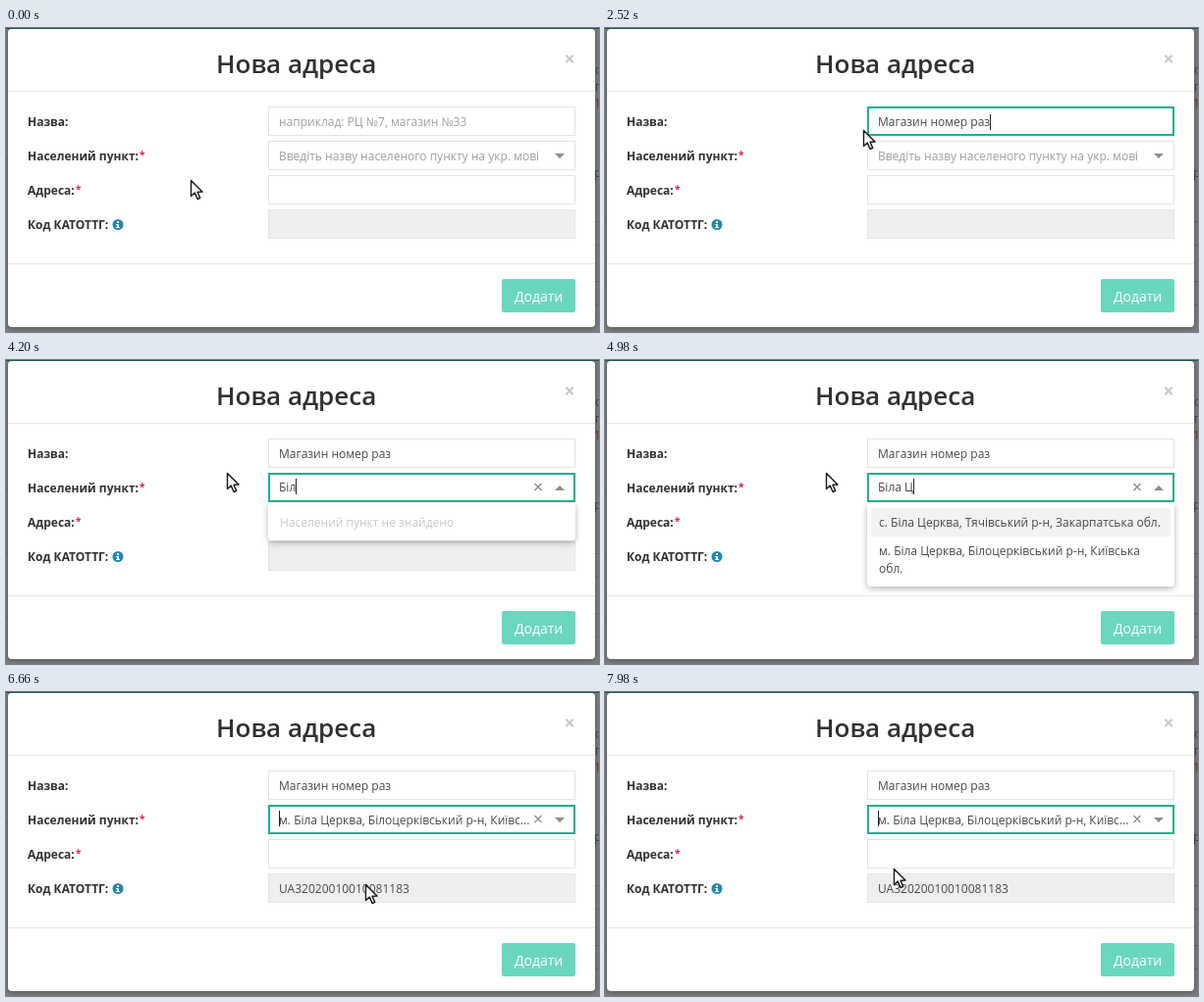
An HTML page with a canvas for the animation above (8000 ms loop, 604 px wide and 310 px high).

```html
<!DOCTYPE html>
<html lang="uk">
<head>
<meta charset="utf-8">
<title>Нова адреса</title>
<style>
html, body { margin: 0; width: 100%; height: 100%; overflow: hidden; background: #7c7c7c; }
canvas { display: block; width: 604px; height: 310px; }
</style>
</head>
<body>
<canvas id="stage"></canvas>
<script>
const W = 604, H = 310, LOOP = 8000, STEP = 60;
const FAMILY = '"Open Sans", "Noto Sans", sans-serif';
const GREEN = '#1fae90', TEXT = '#484848', HINT = '#9f9f9f', BORDER = '#e3e4e5';
const NAME = 'Магазин номер раз';
const QUERY = 'Біла Ц';

// Moments of the scene, in ms
const FOCUS_NAME = 1440, TYPE_NAME = 1500, OPEN_LIST = 2820;
const QUERY_KEYS = [3960, 4080, 4200, 4380, 4620, 4920];
const RESULTS = 4740, HOVER_SECOND = 6420, PICK = 6480;

// Pointer: time, x, y
const PATH = [
  [900, 188, 155], [960, 191, 153], [1020, 208, 142], [1080, 236, 121],
  [1140, 260, 104], [1260, 276, 91], [1440, 276, 91], [1620, 263, 104],
  [2580, 263, 104], [2760, 288, 126], [2880, 288, 126], [3060, 236, 122],
  [3180, 225, 115], [5520, 225, 115], [5700, 240, 126], [6000, 318, 168],
  [6240, 360, 196], [6360, 366, 201], [6540, 366, 196], [7200, 366, 196],
  [7380, 318, 182], [7620, 242, 168], [7800, 282, 177], [7920, 294, 180]
];

const canvas = document.getElementById('stage');
const ctx = canvas.getContext('2d');
const dpr = window.devicePixelRatio || 1;
canvas.width = W * dpr;
canvas.height = H * dpr;

function rect(x, y, w, h, color) {
  ctx.fillStyle = color;
  ctx.fillRect(x, y, w, h);
}

function round(x, y, w, h, r, color) {
  ctx.beginPath();
  ctx.roundRect(x, y, w, h, r);
  ctx.fillStyle = color;
  ctx.fill();
}

function poly(points, color) {
  ctx.beginPath();
  points.forEach(([x, y]) => ctx.lineTo(x, y));
  ctx.closePath();
  ctx.fillStyle = color;
  ctx.fill();
}

function text(str, x, y, color = TEXT, size = 12, weight = 400) {
  ctx.font = `${weight} ${size}px ${FAMILY}`;
  ctx.fillStyle = color;
  ctx.fillText(str, x, y);
  return ctx.measureText(str).width;
}

function cross(x, y, r, width, color) {
  ctx.beginPath();
  ctx.moveTo(x - r, y - r);
  ctx.lineTo(x + r, y + r);
  ctx.moveTo(x + r, y - r);
  ctx.lineTo(x - r, y + r);
  ctx.lineWidth = width;
  ctx.strokeStyle = color;
  ctx.stroke();
}

function field(y, focused, fill = '#fff') {
  const b = focused ? 2 : 1;
  rect(267, y, 313, 30, focused ? GREEN : BORDER);
  rect(267 + b, y + b, 313 - 2 * b, 30 - 2 * b, fill);
}

function caret(x, y, t, since) {
  if (Math.floor((t - since) / 600) % 2 === 0) rect(Math.round(x), y, 1, 16, '#222');
}

function page() {
  rect(0, 0, W, H, '#7c7c7c');
  rect(0, 0, W, 1, '#1d5b4c');
  for (const y of [132, 197, 262]) rect(0, y, 2, 1, '#666');
  for (const y of [197, 221, 258, 282]) rect(600, y, 4, 1, '#666');
  text('о', 600, 47, '#444');
  text('г', 600, 64, '#444');
  text('1', 599, 81, '#7c2c38');
  text('р', 599, 152, '#444');
  ctx.save();
  ctx.shadowColor = 'rgba(0,0,0,.35)';
  ctx.shadowBlur = 5 * dpr;
  ctx.shadowOffsetY = dpr;
  round(2, 1, 598, 304, 4, '#fff');
  ctx.restore();
  rect(2, 64, 598, 1, '#e5e5e5');
  rect(2, 240, 598, 1, '#e5e5e5');
}

function labels() {
  text('Нова адреса', 214, 46, '#303030', 26, 600);
  cross(574, 31.5, 3.7, 2.1, '#c9c9c9');
  ['Назва:', 'Населений пункт:', 'Адреса:', 'Код КАТОТТГ:']
    .forEach((s, i) => text(s, 22, 100 + 35 * i, '#303030', 12, 700));
  text('*', 136, 133, '#d6244f', 10, 700);
  text('*', 71, 168, '#d6244f', 10, 700);

  ctx.beginPath();
  ctx.arc(114, 200.5, 5.5, 0, 7);
  ctx.fillStyle = '#1f87b8';
  ctx.fill();
  rect(113, 197, 2, 2, '#fff');
  rect(112, 200, 3, 1, '#fff');
  rect(113, 200, 2, 4, '#fff');
  rect(112, 203, 4, 1, '#fff');

  round(505, 256, 75, 34, 2, '#6ad6c0');
  text('Додати', 518, 279, '#fff', 14);
}

function nameField(t) {
  const focused = t >= FOCUS_NAME && t < OPEN_LIST;
  const count = Math.max(0, Math.min(NAME.length,
    // a short pause before the last five keys
    t < 2280 ? Math.min(12, Math.floor((t - TYPE_NAME) / 60) + 1)
             : 13 + Math.floor((t - 2280) / 60)));
  field(80, focused);
  let w = 0;
  if (count) w = text(NAME.slice(0, count), 278, 100);
  else text('наприклад: РЦ №7, магазин №33', 278, 100, HINT);
  if (focused) caret(278 + w, 88, t, t < 2520 ? t : 2520);
}

function citySelect(t) {
  const focused = t >= OPEN_LIST, open = focused && t < PICK;
  const keys = QUERY_KEYS.filter(k => k <= t);
  field(115, focused);
  let w = 0;
  if (t >= PICK) text('м. Біла Церква, Білоцерківський р-н, Київс...', 278, 135);
  else if (keys.length) w = text(QUERY.slice(0, keys.length), 278, 134);
  else text('Введіть назву населеного пункту на укр. мові', 278, 135, HINT);
  if (keys.length) cross(542, 129.5, 3.5, 1.2, '#888');
  if (open) poly([[559, 133], [569, 133], [564, 128]], '#8c8c8c');
  else poly([[559, 128], [569, 128], [564, 133]], '#8c8c8c');
  if (focused) caret(278 + w, 121, t, t >= PICK ? PICK : keys.at(-1) ?? OPEN_LIST);
}

function dropdown(t) {
  const found = t >= RESULTS;
  ctx.save();
  ctx.beginPath();
  ctx.rect(255, 146, 340, 120);
  ctx.clip();
  ctx.shadowColor = 'rgba(0,0,0,.3)';
  ctx.shadowBlur = 6 * dpr;
  ctx.shadowOffsetY = 2 * dpr;
  round(267, 146, 313, found ? 85 : 38, [0, 0, 4, 4], '#fff');
  ctx.restore();
  if (!found) {
    text('Населений пункт не знайдено', 279, 170, '#c9c9c9');
    return;
  }
  if (t >= HOVER_SECOND) round(271, 180, 305, 47, 3, '#f2f2f2');
  else round(271, 151, 305, 29, 3, '#f2f2f2');
  text('с. Біла Церква, Тячівський р-н, Закарпатська обл.', 279, 170);
  text('м. Біла Церква, Білоцерківський р-н, Київська', 279, 199);
  text('обл.', 279, 217);
}

function pointer(t) {
  let i = PATH.findIndex(p => p[0] > t);
  if (i < 0) i = PATH.length;
  const a = PATH[Math.max(0, i - 1)], b = PATH[Math.min(i, PATH.length - 1)];
  const k = b[0] > a[0] ? (t - a[0]) / (b[0] - a[0]) : 0;
  ctx.save();
  ctx.translate(Math.round(a[1] + (b[1] - a[1]) * k) + 0.5,
                Math.round(a[2] + (b[2] - a[2]) * k) + 0.5);
  poly([[0, 0], [0, 16], [3.8, 12.6], [6.6, 19], [9.2, 17.9], [6.5, 11.8], [11.5, 11.6]], '#fff');
  ctx.lineWidth = 1.4;
  ctx.lineJoin = 'round';
  ctx.strokeStyle = '#151515';
  ctx.stroke();
  ctx.restore();
}

function draw(now) {
  const t = Math.floor((now % LOOP) / STEP) * STEP;
  ctx.setTransform(dpr, 0, 0, dpr, 0, 0);
  page();
  labels();
  nameField(t);
  citySelect(t);
  field(150, false);
  field(185, false, '#eeeeee');
  if (t >= PICK) text('UA32020010010081183', 278, 205);
  if (t >= OPEN_LIST && t < PICK) dropdown(t);
  pointer(t);
}

let start;
function tick(now) {
  start ??= now;
  draw(Math.max(0, now - start));
  requestAnimationFrame(tick);
}
requestAnimationFrame(tick);
</script>
</body>
</html>
```
